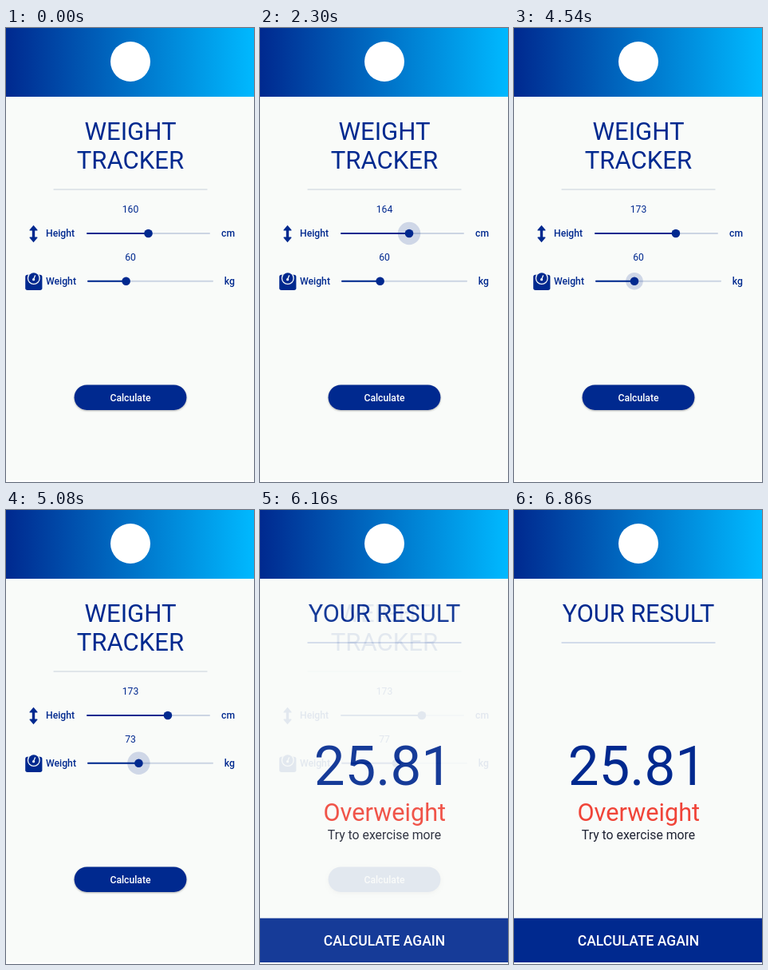
An HTML page that plays this animation: 311 by 568 pixels, repeating every 8000 ms.

```html
<!DOCTYPE html>
<html lang="en">
<head>
<meta charset="utf-8">
<title>Weight tracker</title>
<style>
  html, body { margin: 0; width: 100%; height: 100%; overflow: hidden; background: #fff; }
  svg { display: block; width: 311px; height: 568px; }
  text { font: 12.2px Roboto, sans-serif; fill: #00298f; text-anchor: middle; }
  .med { font-weight: 500; }
  .start { text-anchor: start; }
  .end { text-anchor: end; }
  .title { font-size: 31.1px; }
  .head { font-size: 30.7px; }
  .score { font-size: 69.1px; }
  .hint { font-size: 15.8px; fill: #1f2333; }
  .again { font-size: 17.5px; }
  .alert { fill: #f04438; }
  .light { fill: #fff; }
  .rail { stroke: #ccd5e3; stroke-width: 2; stroke-linecap: round; }
  .fill { stroke: #00298f; stroke-width: 2; stroke-linecap: round; }
  .blue { fill: #00298f; }
  .paper { fill: #f9fbf9; }
</style>
</head>
<body>
<svg viewBox="0 0 311 568">
  <defs>
    <linearGradient id="sky">
      <stop offset="0" stop-color="#00298f"/>
      <stop offset="1" stop-color="#00b9ff"/>
    </linearGradient>
  </defs>
  <rect class="paper" width="311" height="566"/>

  <g id="form">
    <text class="title" x="156" y="140">WEIGHT</text>
    <text class="title" x="156" y="176">TRACKER</text>
    <path d="M59.5 202H252.5" stroke="#d8dfe6" stroke-width="1.7"/>

    <path class="blue" d="M34.5 246.8l4.9 5.6q.5 1-.6 1.1h-2.6v8h2.6q1.1.1.6 1.1l-4.9 5.6-4.9-5.6q-.5-1 .6-1.1h2.6v-8h-2.6q-1.1-.1-.6-1.1z"/>
    <text class="med start" x="50" y="261.3">Height</text>
    <text class="med end" x="287" y="261.3">cm</text>

    <rect class="blue" x="24.2" y="308.7" width="21.2" height="19.2" rx="2.7"/>
    <circle class="paper" cx="34.8" cy="313" r="8"/>
    <circle class="blue" cx="34.8" cy="313" r="6.7"/>
    <path d="M34.6 314.5L36.5 309.8" stroke="#f9fbf9" stroke-width="1.3" stroke-linecap="round"/>
    <circle class="paper" cx="34.6" cy="314.7" r="1.6"/>
    <text class="med start" x="50" y="321.3">Weight</text>
    <text class="med end" x="287" y="321.3">kg</text>

    <g id="sliders"></g>

    <rect id="button" class="blue" x="85.6" y="446.4" width="140.8" height="31.5" rx="15.75"/>
    <text class="med light" x="156" y="466.7">Calculate</text>
  </g>

  <g id="result">
    <rect class="paper" y="86" width="311" height="480"/>
    <path d="M59.5 166H252.5" stroke="#c6d0e6" stroke-width="1.5"/>
    <text class="head" x="156" y="140">YOUR RESULT</text>
    <text class="score" x="154.4" y="343.8">25.81</text>
    <text class="head alert" x="156.3" y="389">Overweight</text>
    <text class="hint" x="156" y="412">Try to exercise more</text>
    <rect class="blue" y="510.7" width="311" height="55.3"/>
    <text class="again med light" x="156" y="544.7">CALCULATE AGAIN</text>
  </g>

  <rect width="311" height="86" fill="url(#sky)"/>
  <circle cx="156" cy="42" r="25" fill="#fff"/>
  <rect y="566" width="311" height="2" fill="#fff"/>
</svg>
<script>
const LOOP = 8000, FPS = 13;
const $ = id => document.getElementById(id);

// Tables of [step, value], one step being 1/13 s.
const height = [[29, 160], [30, 164.4], [34, 175], [37, 175], [39, 175.7], [40, 175.7],
                [42, 176.6], [45, 178], [51, 172.6]];
const heightTouch = [[29, 0], [30, 1], [51, 1], [52, 0]];
const weight = [[58, 60], [59, 60.3], [62, 64.5], [66, 73], [69, 76.8]];
const weightTouch = [[58, 0], [59, .76], [60, 1], [69, 1], [71, 0]];
const press = [[77, 0], [78, 1]];
const reveal = [[78, 0], [79, .5], [80, .91], [82, .97], [85, 1]];

function at(keys, k) {
  if (k <= keys[0][0]) return keys[0][1];
  for (let i = 1; i < keys.length; i++) {
    const [a, u] = keys[i - 1], [b, v] = keys[i];
    if (k <= b) return u + (v - u) * (k - a) / (b - a);
  }
  return keys[keys.length - 1][1];
}

function add(tag, attrs) {
  const el = document.createElementNS("http://www.w3.org/2000/svg", tag);
  for (const name in attrs) el.setAttribute(name, attrs[name]);
  return $("sliders").appendChild(el);
}

function slider(x0, x1, y, min, max) {
  add("path", { class: "rail", d: `M${x0 + 1} ${y}H${x1 - 1}` });
  const fill = add("path", { class: "fill" });
  const halo = add("circle", { class: "blue", cy: y, opacity: .17 });
  const thumb = add("circle", { class: "blue", cy: y, r: 5.3 });
  const label = add("text", { x: 156, y: y - 25.6 });
  return (value, touch) => {
    const x = x0 + (x1 - x0) * (value - min) / (max - min);
    fill.setAttribute("d", `M${x0 + 1} ${y}H${x}`);
    thumb.setAttribute("cx", x);
    halo.setAttribute("cx", x);
    halo.setAttribute("r", 14.2 * touch);
    label.textContent = Math.round(value);
  };
}

const setHeight = slider(101, 256, 257, 120, 200);
const setWeight = slider(102, 260, 316.7, 20, 150);

function draw(t) {
  const k = Math.floor((t + 9) * FPS / 1000);
  setHeight(at(height, k), at(heightTouch, k));
  setWeight(at(weight, k), at(weightTouch, k));
  const p = at(press, k);
  $("button").style.filter =
    `drop-shadow(0 ${1.2 + p}px ${1 + p}px rgba(0,0,0,${.3 + .05 * p}))`;
  $("result").setAttribute("opacity", at(reveal, k));
}

const begin = performance.now();
function tick() {
  draw((performance.now() - begin) % LOOP);
  requestAnimationFrame(tick);
}
tick();
</script>
</body>
</html>
```
